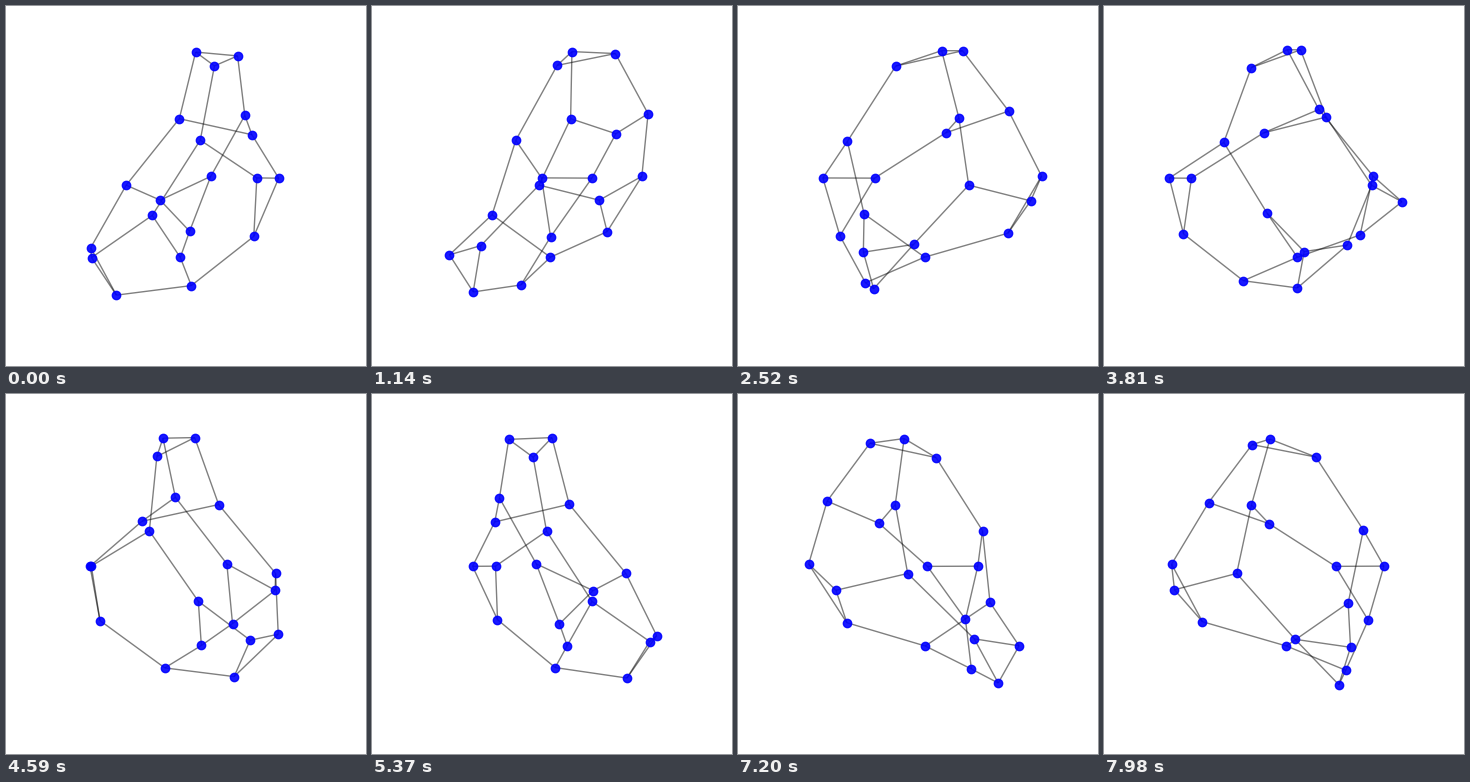
A matplotlib script for the animation above (8 s loop, 360 px wide and 360 px high).

```python
import numpy as np
import matplotlib.pyplot as plt
from matplotlib.animation import FuncAnimation
from matplotlib.collections import LineCollection

SIZE, DPI = 360, 100
TICK, TICKS_PER_STEP, LOOP = 10, 3, 8000   # ms, a one degree step every 30 ms
CENTER = np.array([184.7, 174.6])
DISTANCE = 1946.0
HEIGHT_SCALE = 0.98

# The graph has a two-fold symmetry: half the nodes are given, in pixels
# (right, away from the viewer, down), a half turn about AXIS adds the rest.
AXIS = np.array([0.8138, 0.3005, 0.4974])
HALF = np.array([
    (56.3, 78.4, -69.2), (61.7, 15.9, -47.2), (-11.6, 37.9, -64.4),
    (5.0, 18.5, -132.4), (47.7, 34.2, -129.5), (23.4, -29.2, -115.3),
    (9.2, -76.0, -39.7), (62.6, -103.2, -2.6), (85.5, -55.1, -2.4),
    (60.3, -86.6, 54.4),
])
CHORDS = [(0, 4), (1, 8), (2, 16), (3, 5), (7, 9)]


def build_graph():
    """A ring through all nodes, plus chords that repeat on the other half."""
    twins = 2 * np.outer(HALF @ AXIS, AXIS) - HALF
    nodes = np.vstack([HALF, twins]) * (1, 1, HEIGHT_SCALE)
    count, half = len(nodes), len(HALF)
    ring = [(i, (i + 1) % count) for i in range(count)]
    chords = [((a + turn) % count, (b + turn) % count)
              for a, b in CHORDS for turn in (0, half)]
    return nodes, np.array(ring + chords)


def project(nodes, degrees):
    """Turn the nodes about the vertical axis and apply perspective."""
    c, s = np.cos(np.radians(degrees)), np.sin(np.radians(degrees))
    x, y, z = nodes.T
    near = x * s - y * c
    scale = 1 / (1 - near / DISTANCE)
    return CENTER + np.column_stack([x * c + y * s, z]) * scale[:, None]


nodes, edges = build_graph()

fig = plt.figure(figsize=(SIZE / DPI, SIZE / DPI), dpi=DPI, facecolor="white")
ax = fig.add_axes([0, 0, 1, 1])
ax.set_xlim(0, SIZE)
ax.set_ylim(SIZE, 0)
ax.axis("off")

links = LineCollection([], colors="black", linewidths=1, alpha=0.5, zorder=1)
ax.add_collection(links)
dots, = ax.plot([], [], "o", color="blue", alpha=0.9, markersize=6,
                markeredgewidth=1, zorder=2)


def update(i):
    points = project(nodes, i // TICKS_PER_STEP)
    links.set_segments(points[edges])
    dots.set_data(points[:, 0], points[:, 1])
    return links, dots


def init():
    return update(0)


anim = FuncAnimation(fig, update, frames=LOOP // TICK, init_func=init,
                     interval=TICK, repeat=True, repeat_delay=0, blit=False)
plt.show()
```
